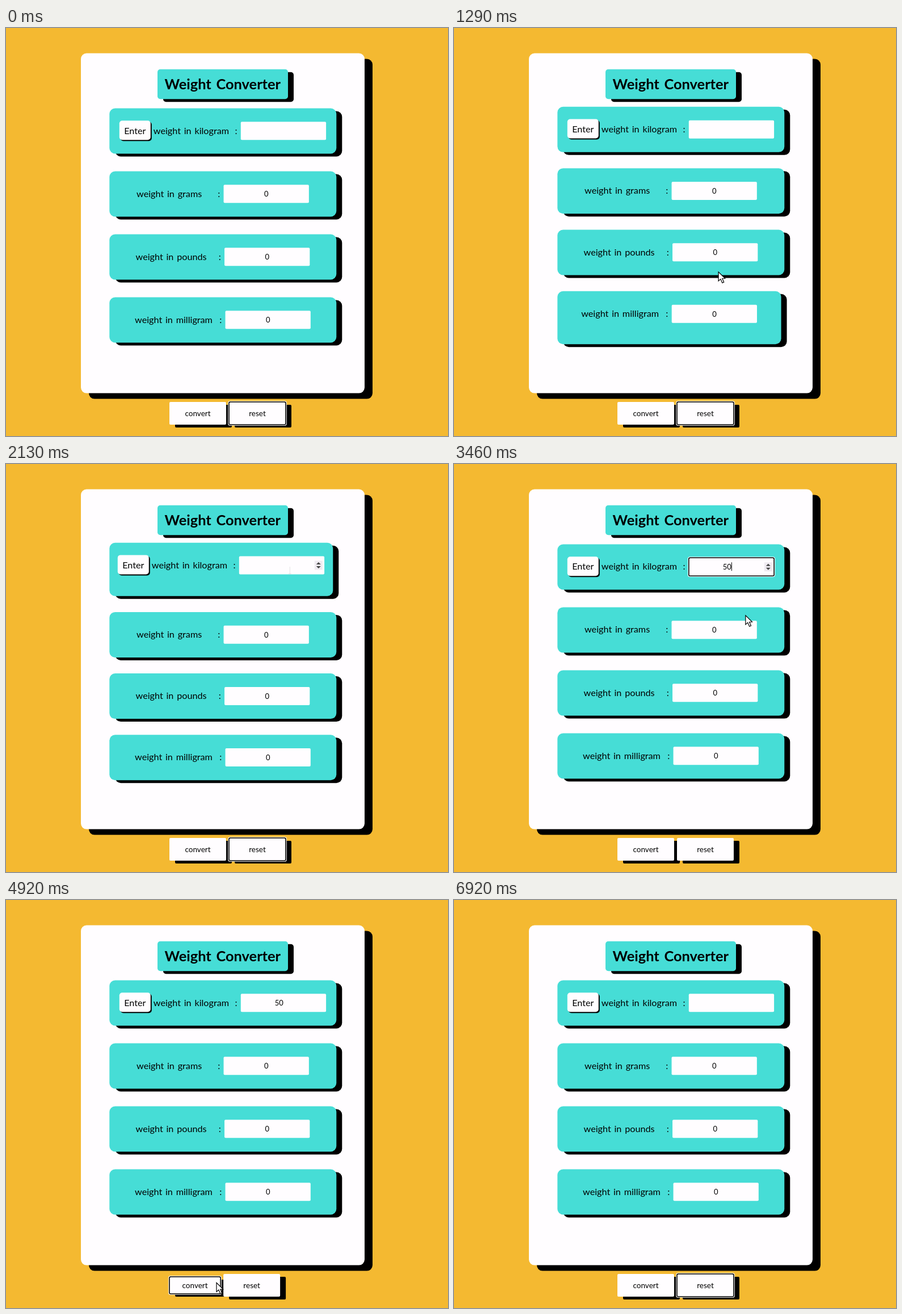
An HTML page with a canvas that plays this animation: 779x719 px, repeating every 7.25 s.

```html
<!DOCTYPE html>
<html lang="en">
<head>
<meta charset="utf-8">
<title>Weight Converter</title>
<style>
html, body { margin: 0; width: 100%; height: 100%; overflow: hidden; background: #f4b931; }
canvas { display: block; }
</style>
</head>
<body>
<canvas id="stage" width="779" height="719"></canvas>
<script>
const ctx = document.getElementById('stage').getContext('2d');
const LOOP = 7250, STEP = 10, FADE = 300;
const WHITE = '#fffdff', TEAL = '#46ddd6', YELLOW = '#f4b931', BLACK = '#000';
const FONT = 'Lato, "Open Sans", sans-serif';
const CENTER = 381.8, LEFT = 182.3, AREA_TOP = 110.5;

// Event times in ms
const FOCUS_INPUT = 2380, TYPE_5 = 2700, TYPE_0 = 2950;
const PRESS_CONVERT = 4880, SHOW_RESULT = 5000;
const PRESS_RESET = 6420, CLEAR = 6480, CURSOR_END = 6920;

// Each row's content is centred; width spans label to input
const rows = [
  { label: 'weight in kilogram', width: 364, factor: 0 },
  { label: 'weight in grams', width: 303.5, factor: 1000 },
  { label: 'weight in pounds', width: 306.5, factor: 2.20462 },
  { label: 'weight in milligram', width: 309.5, factor: 1e6 },
];

// Pointer stops as [time, x, y]
const path = [
  [40, 300, 10], [620, 302, 125], [830, 311, 198], [980, 430, 500],
  [1220, 450, 500], [1290, 466, 430], [1700, 500, 187], [2980, 501, 187],
  [3100, 505, 238], [3430, 512, 246], [3460, 514, 266], [4480, 390, 700],
  [4620, 390, 700], [4800, 371, 674], [5650, 371, 674], [5950, 440, 679],
  [6450, 440, 679], [6600, 494, 680], [LOOP, 494, 680],
];

function pointerAt(t) {
  const i = path.findIndex(key => key[0] > t);
  if (i < 1) return path[0].slice(1);
  const [t0, x0, y0] = path[i - 1], [t1, x1, y1] = path[i];
  const p = (t - t0) / (t1 - t0);
  return [x0 + (x1 - x0) * p, y0 + (y1 - y0) * p];
}

// Boxes of the four rows and two buttons for given hover progresses
function layout(progress) {
  const hover = progress.map(p => p * p * (3 - 2 * p));
  const heights = hover.slice(0, 4).map(h => 80 + 14 * h);
  const gap = (475 - heights.reduce((a, b) => a + b)) / 5;
  let y = AREA_TOP, x = 288;
  return hover.map((amount, i) => {
    if (i < 4) {
      const box = { x: LEFT, y: y + gap, w: 400 - 6 * amount, h: heights[i] };
      y += gap + heights[i];
      return box;
    }
    const w = 100 - 10 * amount, h = 40 - 10 * amount;
    const box = { x, y: 679 - h / 2, w, h };
    x += w + 5;
    return box;
  });
}

const inside = (box, x, y) =>
  x >= box.x && x < box.x + box.w && y >= box.y && y < box.y + box.h;

// Hover transitions follow from the pointer path, so every layout is known up front
const layouts = [];
let progress = Array(6).fill(0);
for (let t = 0; t < LOOP; t += STEP) {
  const boxes = layout(progress);
  layouts.push(boxes);
  const visible = t >= path[0][0] && t < CURSOR_END;
  const [x, y] = pointerAt(t);
  progress = progress.map((p, i) => {
    const direction = visible && inside(boxes[i], x, y) ? 1 : -1;
    return Math.min(1, Math.max(0, p + direction * STEP / FADE));
  });
}

function rect(x, y, w, h, r, color) {
  ctx.fillStyle = color;
  ctx.beginPath();
  ctx.roundRect(x, y, w, h, r);
  ctx.fill();
}

function panel(x, y, w, h, r, color, dx = 10, dy = 5) {
  rect(x + dx, y + dy, w, h, r, BLACK);
  rect(x, y, w, h, r, color);
}

function focusRing(x, y, w, h) {
  const grown = (d, r, color) => rect(x - d, y - d, w + 2 * d, h + 2 * d, r, color);
  grown(1.8, 3.5, WHITE);
  grown(0.8, 3, BLACK);
  grown(-0.8, 1.5, WHITE);
}

function text(str, x, y, size, align = 'left', weight = 400) {
  ctx.font = `${weight} ${size}px ${FONT}`;
  ctx.wordSpacing = size * 0.1 + 'px';
  ctx.textAlign = align;
  ctx.fillStyle = BLACK;
  ctx.fillText(str, x, y);
}

function polygon(points) {
  ctx.beginPath();
  points.forEach(([x, y]) => ctx.lineTo(x, y));
  ctx.closePath();
  ctx.fill();
}

function spinner(x, y) {
  rect(x - 7, y - 8, 14, 16, 0, '#efebf1');
  ctx.fillStyle = '#444';
  for (const s of [-1, 1]) {
    polygon([[x - 4, y + s * 1.5], [x + 4, y + s * 1.5], [x, y + s * 5.5]]);
  }
}

function typedValue(t) {
  if (t < TYPE_5 || t >= CLEAR) return '';
  return t < TYPE_0 ? '5' : '50';
}

function rowValue(row, t) {
  if (!row.factor) return typedValue(t);
  const done = t >= SHOW_RESULT && t < CLEAR;
  return done ? String(+(50 * row.factor).toFixed(3)) : '0';
}

function drawRow(row, box, t, [px, py]) {
  const editable = !row.factor;
  const center = CENTER + (box.w - 400) / 2;
  let x = center - row.width / 2;
  const baseline = box.y + 45;

  panel(box.x, box.y, box.w, box.h, 10, TEAL);
  if (editable) {
    panel(x, box.y + 21.7, 55, 34, 5, WHITE, 2, 2);
    text('Enter', x + 27.5, baseline, 16.2, 'center');
    x += 60;
  }
  text(row.label, x, baseline, 16.2);

  const input = { x: center + row.width / 2 - 150, y: box.y + 23.8, w: 150.3, h: 32 };
  text(':', input.x - 8.3, baseline, 16.2, 'center');
  const focused = editable && t >= FOCUS_INPUT && t < PRESS_CONVERT;
  (focused ? focusRing : rect)(input.x, input.y, input.w, input.h, 2, WHITE);

  const value = rowValue(row, t), valueX = input.x + (editable ? 67.5 : 75.3);
  text(value, valueX, box.y + 44.7, 13, 'center');
  const hovered = editable && inside(input, px, py);
  if (focused || hovered) spinner(input.x + 140, input.y + 16);

  const blinkStart = [TYPE_0, TYPE_5, FOCUS_INPUT].find(time => t >= time);
  if (focused && (t - blinkStart) % 1100 < 550) {
    rect(valueX + ctx.measureText(value).width / 2, input.y + 8, 1, 15, 0, BLACK);
  }
  return hovered;
}

function drawButton(label, { x, y, w, h }, focused) {
  panel(x, y, w, h, 2, WHITE);
  if (focused) focusRing(x, y, w, h);
  text(label, x + w / 2, 683.5, 13.5, 'center');
}

function drawArrow(x, y) {
  ctx.save();
  ctx.translate(x, y + 0.5);
  ctx.fillStyle = WHITE;
  ctx.strokeStyle = BLACK;
  ctx.lineWidth = 1.2;
  polygon([[0, 0], [0, 16], [3.8, 12.5], [6.8, 19.3], [9.6, 18], [6.8, 11.6], [11.6, 11.4]]);
  ctx.stroke();
  ctx.restore();
}

function drawTextCursor(x, y) {
  rect(x - 0.5, y - 6, 1, 13, 0, '#e6e2e6');
  rect(x - 2.5, y + 6, 5, 1, 0, '#e6e2e6');
}

function draw(t) {
  rect(0, 0, 779, 719, 0, YELLOW);
  panel(132, 44.6, 500, 599, 10, WHITE, 14, 10);
  panel(267, 72.8, 230, 52.5, 5, TEAL);
  text('Weight Converter', CENTER, 108, 25.4, 'center', 700);

  const boxes = layouts[Math.floor(t / STEP)];
  const pointer = pointerAt(t);
  const overInput = rows.map((row, i) => drawRow(row, boxes[i], t, pointer)).includes(true);

  drawButton('convert', boxes[4], t >= PRESS_CONVERT && t < PRESS_RESET);
  drawButton('reset', boxes[5], t < FOCUS_INPUT || t >= PRESS_RESET);

  if (t >= path[0][0] && t < CURSOR_END) {
    (overInput ? drawTextCursor : drawArrow)(...pointer);
  }
}

const start = performance.now();
function frame() {
  draw((performance.now() - start) % LOOP);
  requestAnimationFrame(frame);
}
frame();
</script>
</body>
</html>
```
